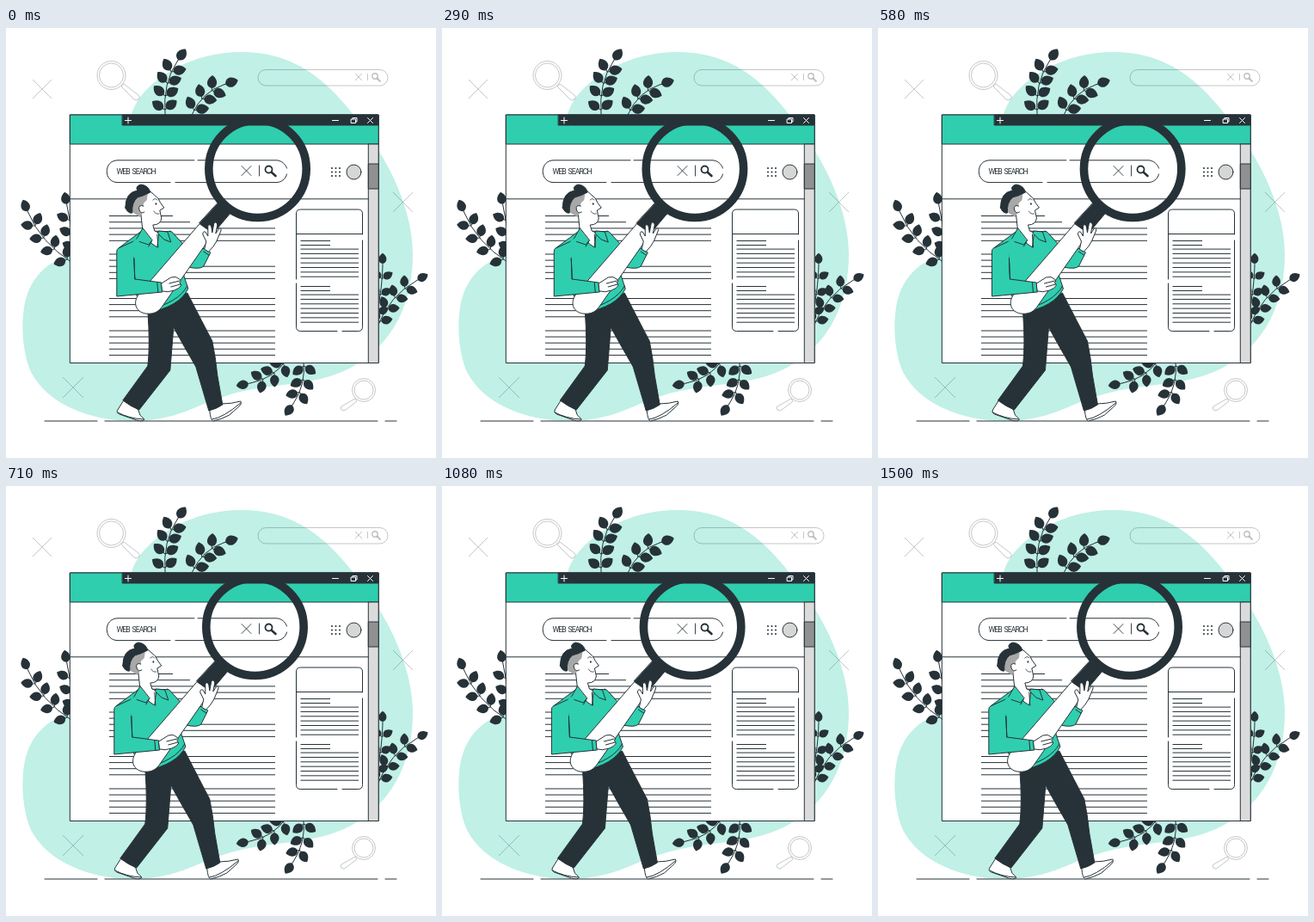
Write an HTML page that moves like this. It is 500 px wide and 500 px high and loops after 1.54 s.

```html
<!DOCTYPE html>
<html lang="en">
<head>
<meta charset="utf-8">
<title>Web search</title>
<style>
  html, body { margin: 0; width: 100%; height: 100%; overflow: hidden; background: #fff; }
  svg { display: block; width: 100vw; height: 100vh; }
  .line { fill: none; stroke: #263238; stroke-width: 1; stroke-linecap: round; stroke-linejoin: round; }
  .white { fill: #fff; }
  .green { fill: #2fceae; }
  .dark { fill: #263238; }
  .faint { fill: none; stroke: #263238; stroke-opacity: .3; stroke-width: .9; }
  text { font: 400 8.8px Roboto, sans-serif; letter-spacing: -1px; word-spacing: 1.5px; fill: #263238; }
</style>
</head>
<body>
<svg viewBox="0 0 500 500">
  <path fill="#c0f0e6" d="M146 101C155 66 210 28 272 28C340 27 379 67 411 110C448 158 473 214 473 263C473 318 452 362 411 389C365 420 305 410 252 429C217 440 201 455 152 457C98 458 48 437 29 400C17 372 17 330 25 309C35 283 52 271 75 264H146Z"/>

  <g class="faint">
    <path d="M31 60l22 22m0-22l-22 22M450 191l23 23m0-23l-23 23M66 406l24 24m0-24l-24 24"/>
    <circle cx="122.500" cy="55" r="16.500"/><circle cx="122.500" cy="55" r="14"/>
    <path d="M134 68l3-3 17 13q3 3 0 5t-5 0z"/>
    <circle cx="416" cy="421" r="13.500"/><circle cx="416" cy="421" r="11"/>
    <path d="M406 431l2 3-13 10q-3 2-5 0t0-4z"/>
    <rect x="293" y="48.500" width="151" height="18.500" rx="9.200"/>
    <path d="M406 53l8 8m0-8l-8 8M420.500 53v8"/>
    <circle cx="429" cy="56" r="3.200" stroke-width="1.400"/><path d="M431.500 58.500l4 4" stroke-width="2"/>
  </g>

  <g id="plants"></g>
  <path class="line" stroke-linecap="butt" d="M45 457H106M115 457H432M441 457H454"/>

  <g class="line">
    <rect class="white" x="74.700" y="101" width="358.500" height="288.500"/>
    <rect class="green" x="74.700" y="101" width="358.500" height="34"/>
    <rect class="dark" x="135.500" y="101" width="297.500" height="12"/>
    <path d="M75 198.800H422"/>
    <rect x="421.700" y="135" width="11.500" height="254.500" fill="#dbdbdb"/>
    <rect x="421.700" y="158" width="11.500" height="29" fill="#919191"/>
    <path stroke="#fff" d="M138.500 107.500h7m-3.500-3.500v7M379.500 107.500h7M420.500 104.500l6 6m0-6l-6 6M401.500 106h5v4.500h-5zM403 106v-1.500h5v4.500h-1.500"/>
    <path d="M219 153.800H130C113 153.800 113 179.600 130 179.600H191M197 179.600H314C320 179.600 325 176 326.500 170M326.500 163C325 158 320 153.800 314 153.800H223"/>
    <path d="M274 160.500l11 11m0-11l-11 11M294.500 160v12" stroke-width=".9"/>
    <circle cx="305.500" cy="164.500" r="4" stroke-width="1.800"/>
    <path d="M309 168l4.500 4" stroke-width="2.600"/>
    <circle cx="404.500" cy="167.500" r="8.500" fill="#d6d6d6"/>
    <path d="M414.500 240V216Q414.500 211 409.500 211H342.500Q337.500 211 337.500 216V292M337.500 297V347.500Q337.500 352.500 342.500 352.500H385M391 352.500H409.500Q414.500 352.500 414.500 347.500V247M337.500 239.500H414.500"/>
    <path id="copy" stroke-linecap="butt"/>
  </g>
  <text x="128.500" y="170">WEB SEARCH</text>
  <path id="dots" class="line" style="stroke-width:2"/>

  <g id="man" class="line">
    <!-- legs and shoes -->
    <path class="white" d="M137 433L130 444Q128 447 132 449L152 456Q160 458 161 455L156 450L154 444ZM130 447Q143 454 160 455"/>
    <path class="white" d="M236 444L251 437Q262 437 273 434Q275 437 270 441L260 450Q251 455 241 457Q238 456 237 445ZM240 455Q253 453 273 436"/>
    <path class="dark" d="M165 328L211 308Q230 345 240 364Q244 383 246 404L252 438Q245 443 236 445L221 394Q207 370 195 348L191 398L155 444Q145 440 136 433L165 393Q168 370 165 328Z"/>
    <!-- torso -->
    <path class="green" d="M191 236L216 262L231 256L238 261L230 277Q226 281 212 278L204 270Z"/>
    <path d="M230 260L236 264"/>
    <path class="green" d="M158 236L131 256L150 308L165 331Q202 324 212 303L207 288L216 262L193 237Z"/>
    <path d="M165 328Q201 319 211 300"/>
    <!-- head -->
    <path class="white" d="M157 216L159 235L170 251L176 255L178 238L173 236L171 229Q180 229 181 221L179 212L184 209Q179 203 177 198L168 190L154 192L149 211Z"/>
    <path fill="#a8a8a8" stroke="none" d="M146 200L165 193L164 200L160 204V212L156 220L147 214Z"/>
    <path class="dark" d="M139 209Q139 191 153 189Q150 184 157 182Q166 183 168 191Q161 195 153 197Q146 203 147 215Q142 216 139 209Z"/>
    <path class="white" d="M160 207Q154 205 155 211Q157 217 161 214"/>
    <path d="M171 200Q174 197 176 200M172 213Q174 217 178 216" stroke-width=".8"/>
    <ellipse class="dark" cx="174.500" cy="204.500" rx=".4" ry=".9"/>
    <!-- collar -->
    <path class="green" d="M159 233L151 247L166 252L170 247ZM178 236L188 237L192 249L184 246L177 239ZM170 247L166 254M176 240L177 255"/>
    <!-- magnifier -->
    <circle cx="292.700" cy="163.800" r="56.700" stroke-width="9.600"/>
    <path class="dark" d="M249 201L263 213L241 239L225 227Z"/>
    <path class="white" d="M225 228L155 309C147 319 151 330 162 332C171 333 176 331 181 325L241 239Z"/>
    <!-- near arm and hands -->
    <path class="green" d="M153 246L131 256Q129 257 129 260V312L182 307L181 296L150 292L149 268L153 246"/>
    <path class="green" stroke="none" d="M154 244L148 248L149 268L158 262Z"/>
    <path d="M149 268L150 292M176 296L177 307"/>
    <path class="white" d="M181 297L192 290Q198 288 202 292Q205 294 202 296L204 299Q202 303 196 305Q188 308 182 306ZM190 297L202 294M192 301L203 298"/>
    <path class="white" d="M231 257L233 248L229 240Q229 236 232 237L235 242L235 230Q237 227 239 231L240 238L242 227Q245 224 246 229L244 239L248 233Q251 232 250 236L245 248Q242 254 236 260Z"/>
  </g>
</svg>

<script>
const $ = id => document.getElementById(id);

// A rounded leaf drawn from its base, pointing along `angle` (degrees).
const leaf = (x, y, angle, size) =>
  `<path class="dark" transform="translate(${x} ${y}) rotate(${angle}) scale(${size})"
    d="M0 -.03H.15C.3 -.5 .8 -.45 1.1 0C.8 .45 .3 .45 .15 .03H0"/>`;

// A curved stem with leaf pairs and one leaf at the tip.
function branch(x0, y0, cx, cy, x1, y1, pairs, size) {
  let out = `<path class="line" d="M${x0} ${y0}Q${cx} ${cy} ${x1} ${y1}"/>`;
  for (let i = 0; i <= pairs; i++) {
    const u = (i + .35) / (pairs + .35), v = 1 - u;
    const x = v * v * x0 + 2 * u * v * cx + u * u * x1;
    const y = v * v * y0 + 2 * u * v * cy + u * u * y1;
    const dx = v * (cx - x0) + u * (x1 - cx), dy = v * (cy - y0) + u * (y1 - cy);
    const angle = Math.atan2(dy, dx) * 180 / Math.PI;
    for (const turn of i < pairs ? [-54, 54] : [0]) out += leaf(x, y, angle + turn, size);
  }
  return out;
}

$('plants').innerHTML = [
  [185, 101, 182, 64, 199, 39, 4, 16],
  [216, 101, 228, 74, 253, 66, 3, 16],
  [77, 273, 40, 249, 26, 215, 4, 15],
  [82, 262, 76, 235, 71, 207, 3, 15],
  [432, 347, 446, 311, 477, 294, 4, 14],
  [430, 340, 438, 300, 438, 276, 3, 13],
  [326, 386, 311, 408, 284, 413, 3, 15],
  [346, 387, 349, 415, 334, 437, 3, 15]
].map(args => branch(...args)).join('');

let copy = '';
const rows = (x, y, step, ends) => ends.forEach((end, i) => copy += `M${x} ${y + i * step}H${end}`);
const wide = 313, full = 410, part = 377;
rows(120, 218.5, 7.2, [194, 214, wide, wide, wide]);
rows(120, 263, 7.1, [194, 214, wide, wide, wide]);
rows(120, 314.5, 7.1, [wide, wide, wide, wide]);
rows(120, 352, 7.1, [wide, wide, wide, wide, wide]);
for (const y of [247.5, 300.5]) {
  rows(342.5, y, 5, [part, part]);
  rows(342.5, y + 9.6, 5.35, Array(7).fill(full));
}
$('copy').setAttribute('d', copy);

let dots = '';
for (let i = 0; i < 9; i++) dots += `M${379 + i % 3 * 4.5} ${163 + Math.floor(i / 3) * 4.5}h.01`;
$('dots').setAttribute('d', dots);

// Sideways shake, one value per tenth of a 1500 ms cycle, stepped at 24 fps.
const shake = [0, -1, 2, -4, 4, -4, 4, -4, 2, -1, 0];
const start = performance.now();

function draw(now) {
  const t = Math.max(0, now - start) % 1540;
  const step = Math.min(36, Math.floor((t + 5) * 24 / 1000));
  const pos = ((step / 24 + .027) / 1.5 % 1) * 10, i = Math.floor(pos);
  const x = shake[i] + (shake[i + 1] - shake[i]) * (pos - i);
  $('man').setAttribute('transform', `translate(${x.toFixed(3)} 0)`);
  requestAnimationFrame(draw);
}
draw(start);
</script>
</body>
</html>
```
